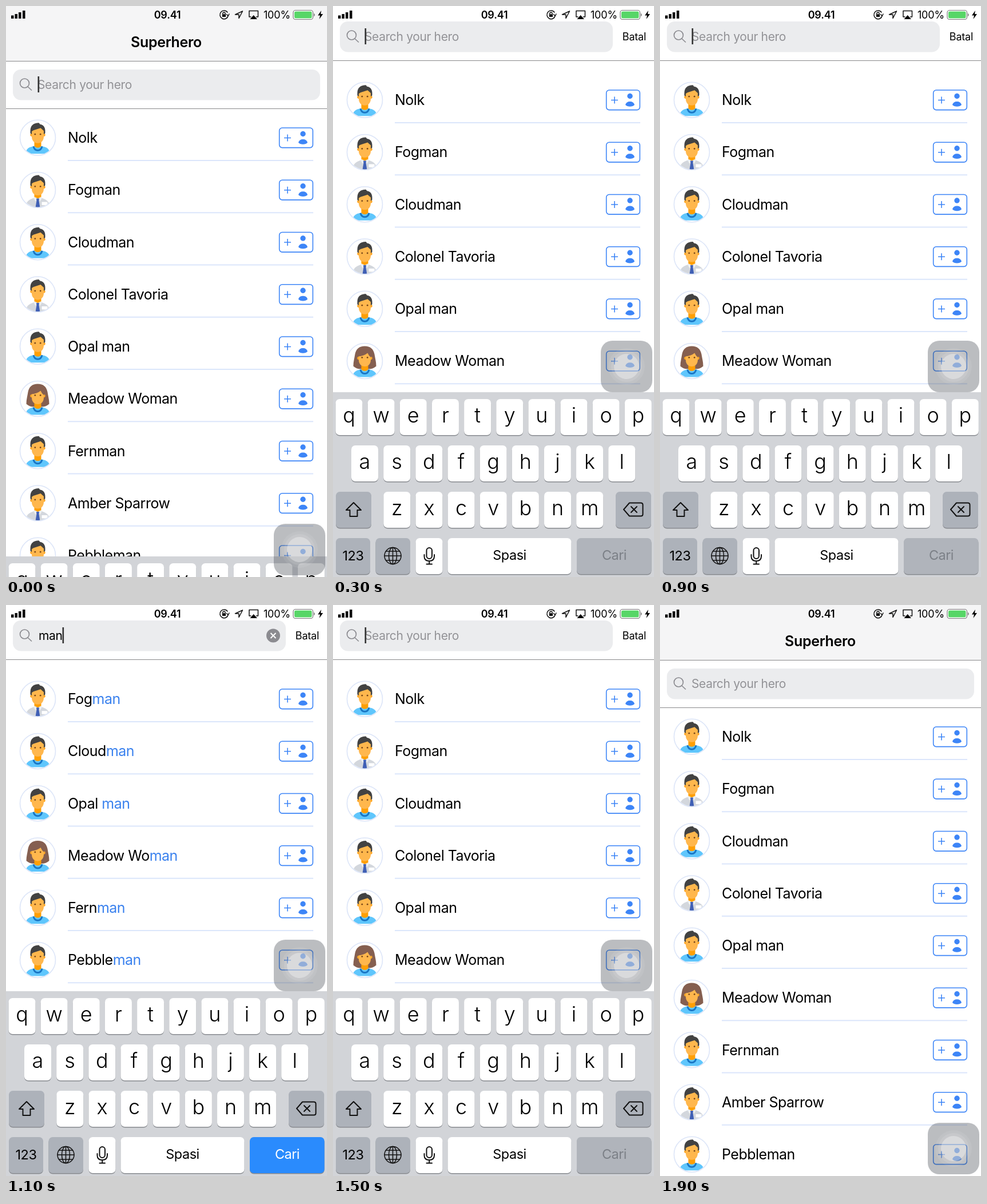
Write an HTML page that moves like this. It is 561 px wide and 998 px high and loops after 2000 ms.

```html
<!DOCTYPE html>
<html lang="id">
<head>
<meta charset="utf-8">
<title>Superhero</title>
<style>
  html, body { margin: 0; width: 100%; height: 100%; overflow: hidden; background: #fff; }
  svg { display: block; width: 561px; height: 998px; }
  text { font-family: Inter, "Open Sans", sans-serif; letter-spacing: -.5px; white-space: pre; }
  .name { font-size: 25px; }
  .name tspan { fill: #3b82ee; }
  .title { font-size: 25px; font-weight: 600; text-anchor: middle; letter-spacing: -.35px; }
  .field { font-size: 21px; letter-spacing: -.35px; }
  .status { font-size: 18px; letter-spacing: -.2px; }
  .key { font-size: 36px; font-weight: 350; text-anchor: middle; letter-spacing: 0; }
  .word { font-size: 23.5px; text-anchor: middle; }
  .popup { filter: drop-shadow(0 1px 3px rgba(0,0,0,.4)); }
  .line { fill: none; stroke: #111; stroke-width: 2; stroke-linecap: round; stroke-linejoin: round; }
  .thin { stroke-width: 1.5; }
</style>
</head>
<body>
<svg viewBox="0 0 561 998">
  <defs>
    <clipPath id="round"><circle r="30"/></clipPath>
    <g id="face">
      <circle cx="-10.5" cy="-5" r="2.7" fill="#ffa726"/><circle cx="10.5" cy="-5" r="2.7" fill="#ffa726"/>
      <path d="M-10.5-16Q0-22 10.5-16V-2C10.5 5 6 9.500 0 9.500S-10.5 5-10.5-2Z" fill="#ffb74d"/>
      <circle cx="-4.7" cy="-6" r="1.4" fill="#784719"/><circle cx="4.7" cy="-6" r="1.4" fill="#784719"/>
    </g>
    <path id="shoulders" d="M-21 28C-21 20-16 16-7 15H7C16 16 21 20 21 28Z"/>
    <path id="hair" d="M-13-8V-12C-13-21-8-26 2-26L4-23.500C11-22.500 13-17 13-12V-8L10.500-6V-12L5-17L-7.500-13L-10.500-11V-6Z" fill="#424242"/>
    <path id="neck" d="M-6 4H6V15Q0 20-6 15Z" fill="#ff9f04"/>
    <g id="collar">
      <path d="M-7.500 15Q-6 22 0 22T7.500 15" fill="none" stroke="#1976c5" stroke-width="3"/>
      <use href="#neck"/>
    </g>
    <g id="casual">
      <use href="#shoulders" fill="#5fc6fc"/><use href="#collar"/><use href="#face"/><use href="#hair"/>
    </g>
    <g id="office">
      <path d="M-21 31C-21 21-16 17-7 14H7C16 17 21 21 21 31Z" fill="#d3d7dd"/>
      <use href="#neck"/>
      <path d="M-6 12L0 15L6 12L7 15L4 20L0 16L-4 20L-7 15Z" fill="#eceff1"/>
      <path d="M-2.500 15H2.500L2 19L4 31H-4L-2 19Z" fill="#3f5fb5"/>
      <rect x="7" y="21" width="10" height="5.5" fill="#fff"/>
      <use href="#face"/><use href="#hair"/>
    </g>
    <g id="lady">
      <path d="M0-26C-10-26-15-21-17-12C-18-5-20 1-20 9C-17 12-12 14-7 14H7C12 14 17 12 20 9C20 1 18-5 17-12C15-21 10-26 0-26Z" fill="#855f50"/>
      <use href="#shoulders" fill="#5fc6fc"/><use href="#collar"/><use href="#face"/>
      <path d="M-11-5V-17Q0-27 11-17V-6Q7-9 5-14Q-1-9-11-8Z" fill="#855f50"/>
    </g>
    <g id="add" fill="#3d85f7">
      <rect x="477.7" y="-17.2" width="58.6" height="34.6" rx="5" fill="none" stroke="#3d85f7" stroke-width="1.6"/>
      <path d="M486 .3H498M492-5.700V6.300" stroke="#3d85f7" stroke-width="1.6"/>
      <circle cx="519" cy="-6.700" r="4.700"/>
      <path d="M511 8.500C512 4.500 515 2.700 519 2.700S526 4.500 527 8.500C524 12.500 514 12.500 511 8.500Z"/>
    </g>
    <g id="status">
      <path d="M9 22V16.500H13.500V22ZM15.500 22V14H20V22ZM22 22V11H26.500V22ZM29 22V8H33.500V22Z"/>
      <text class="status" x="282" y="22" text-anchor="middle" font-weight="600">09.41</text>
      <g class="line thin">
        <path d="M387 11A7.300 7.300 0 1 0 388.300 17M385.500 14.500L388.300 17.500L390 14"/>
        <path d="M379 14.500V13A2 2 0 0 1 383 13V14.500"/>
        <path d="M413.500 9L400.500 15H407V21.500Z"/>
        <path d="M428 19H425V8.500H440.500V19H437.500"/>
      </g>
      <path d="M378 14.500H384V19H378ZM432.700 16L439 23H426.500Z"/>
      <text class="status" x="450" y="22">100%</text>
      <rect x="502" y="7.500" width="34.500" height="16" rx="4" fill="#fff" stroke="#777" stroke-width="1.200"/>
      <rect x="504" y="9.500" width="30.500" height="12" rx="2.500" fill="#57d667"/>
      <path d="M538 12.500Q541.500 15.500 538 18.500Z" fill="#777"/>
      <path d="M551 8L545 16.500H549L547.500 23L554 14H550Z"/>
    </g>
    <g id="touch">
      <rect x="468" width="90" height="90" rx="20" fill="rgba(62,66,74,.35)"/>
      <g fill="#fff"><circle cx="513" cy="45" r="32" opacity=".07"/><circle cx="513" cy="45" r="27" opacity=".1"/><circle cx="513" cy="45" r="22" opacity=".32"/></g>
    </g>
  </defs>
  <g id="screen"></g>
</svg>
<script>
const heroes = [
  ['Nolk', 'casual'], ['Fogman', 'office'], ['Cloudman', 'casual'],
  ['Colonel Tavoria', 'office'], ['Opal man', 'casual'], ['Meadow Woman', 'lady'],
  ['Fernman', 'casual'], ['Amber Sparrow', 'office'], ['Pebbleman', 'casual']
];

const idle = { keys: 323, nav: 0, search: 0, list: 0, touch: 905, query: '', focus: false, active: false };
const editing = { keys: 0, nav: -98, search: -84, list: -66, touch: 585, query: '', focus: true, active: true };
const typed = (query, popup) => ({ ...editing, query, popup });

// One state per 100 ms.
const steps = [
  { ...idle, keys: 287, focus: true },
  { ...editing, keys: 90, nav: -50, search: -48, list: -40, touch: 905 },
  editing, editing,
  typed('fo'), typed('fog'), typed('fogma', true), typed('fogman'), typed('fogman'),
  typed(''), typed('ma'), typed('man'), typed('man'), typed('man'),
  editing, editing,
  { ...idle, keys: 315, nav: -1, search: -18, touch: 585 },
  idle, idle, idle
];

const at = (x, y, body) => `<g transform="translate(${x} ${y})">${body}</g>`;
const label = (cls, x, y, text, extra = '') => `<text class="${cls}" x="${x}" y="${y}" ${extra}>${text}</text>`;
const rule = y => `<path d="M0 ${y}H561" stroke="#88888a"/>`;

function marked(name, query) {
  const i = query ? name.toLowerCase().indexOf(query) : -1;
  if (i < 0) return name;
  const end = i + query.length;
  return `${name.slice(0, i)}<tspan>${name.slice(i, end)}</tspan>${name.slice(end)}`;
}

function list({ query, list }) {
  return heroes.filter(([name]) => name.toLowerCase().includes(query))
    .map(([name, look], i) => at(0, 230.2 + list + i * 91.25,
      at(55.5, 0, `<circle r="31" fill="#fff" stroke="#dce5f8" stroke-width="1.6"/>
        <g clip-path="url(#round)"><use href="#${look}"/></g>`) +
      label('name', 108, 8.8, marked(name, query)) +
      `<use href="#add"/><path d="M108 39.800H537" stroke="#dbe6fb" stroke-width="1.8"/>`)).join('');
}

function search({ search, query, focus, active }) {
  const right = active ? 489 : 549;
  const clear = `<circle cx="467" cy="137.500" r="12" fill="#8b8b90"/>
    <path d="M462.500 133L471.500 142M471.500 133L462.500 142" stroke="#fff" stroke-width="2"/>`;
  return at(0, search, `<rect y="0" width="561" height="179.500" fill="#fff"/>` + rule(179.5) +
    `<rect x="12" y="111" width="${right - 12}" height="53.500" rx="14" fill="#ebecee"/>
    <g fill="none" stroke="#8b8b90" stroke-width="1.700"><circle cx="32.500" cy="135" r="8"/><path d="M38 141L45 147.500"/></g>` +
    (query ? label('field', 57, 145, query, 'id="query"') + clear
           : label('field', 55, 145, 'Search your hero', 'fill="#929296"')) +
    (focus ? '<rect id="caret" x="55.500" y="123" width="2.600" height="28" fill="#333"/>' : '') +
    (active ? label('status', 526.5, 143.5, 'Batal', 'text-anchor="middle"') : ''));
}

const nav = s => at(0, s.nav, `<rect width="561" height="96" fill="#f5f5f6"/>` +
  rule(96.5) + label('title', 280, 72, 'Superhero'));

const gray = '#adb2ba';
const cap = (x, y, w, fill = '#fff') =>
  `<rect x="${x}" y="${y + 1.6}" width="${w}" height="63" rx="7" fill="#888b90"/>
   <rect x="${x}" y="${y}" width="${w}" height="63" rx="7" fill="${fill}"/>`;

const letterRow = (letters, x0, y) => [...letters].map((c, i) => {
  const x = x0 + i * 56.15;
  return cap(x, y, 47) + label('key', x + 23.5, y + 41, c);
}).join('');

const popup = `<path class="popup" fill="#fff" d="M364 76H422Q436 76 436 90V146C436 162 417 164 417 180V230Q417 237 410 237H376Q369 237 369 230V180C369 164 350 162 350 146V90Q350 76 364 76Z"/>`
  + label('key', 393, 140, 'n', 'style="font-size:56px"');

function keyboard(s) {
  const on = s.query !== '';
  return at(0, 675 + s.keys, `<rect width="561" height="323" fill="#d2d4d8"/>` +
    letterRow('qwertyuiop', 4.5, 12) + letterRow('asdfghjkl', 32, 93) + letterRow('zxcvbnm', 88.3, 174) +
    cap(5, 174, 62, gray) + cap(494, 174, 62, gray) +
    cap(5, 255, 60, gray) + cap(74.5, 255, 60.5, gray) + cap(144.5, 255, 47) + cap(200.5, 255, 216) +
    cap(426, 255, 130.5, on ? '#2a8bfd' : '#b0b4bb') +
    label('word', 35, 294, '123') + label('word', 308.5, 293, 'Spasi') +
    label('word', 491.5, 293, 'Cari', `fill="${on ? '#fff' : '#7c8087'}"`) +
    `<g class="line">
      <path d="M36 193L49 206H42.500V217H29.500V206H23Z"/>
      <path d="M508 205L518 193.500H538Q541.500 193.500 541.500 197V213Q541.500 216.500 538 216.500H518ZM521 200L531 210M531 200L521 210"/>
      <g class="thin"><circle cx="104.500" cy="286" r="14.500"/><ellipse cx="104.500" cy="286" rx="7" ry="14.500"/>
      <path d="M104.500 271.500V300.500M90 286H119M93 278H116M93 294H116"/></g>
      <rect x="163.500" y="272" width="9.500" height="19" rx="4.700"/>
      <path d="M159.500 284V287Q159.500 295 168.200 295T177 287V284M168.200 295V300M163.500 300.500H173"/>
    </g>` + (s.popup ? popup : ''));
}

const screen = document.getElementById('screen');
function render(s) {
  screen.innerHTML = list(s) + search(s) + nav(s) + '<use href="#status"/>' + keyboard(s) +
    at(0, s.touch, '<use href="#touch"/>');
  const query = document.getElementById('query');
  const caret = document.getElementById('caret');
  if (query && caret) caret.setAttribute('x', 57 + query.getComputedTextLength());
}

const start = performance.now();
let shown = -1;
function tick() {
  const step = Math.floor((performance.now() - start) / 100) % steps.length;
  if (step !== shown) render(steps[shown = step]);
  requestAnimationFrame(tick);
}
tick();
</script>
</body>
</html>
```
